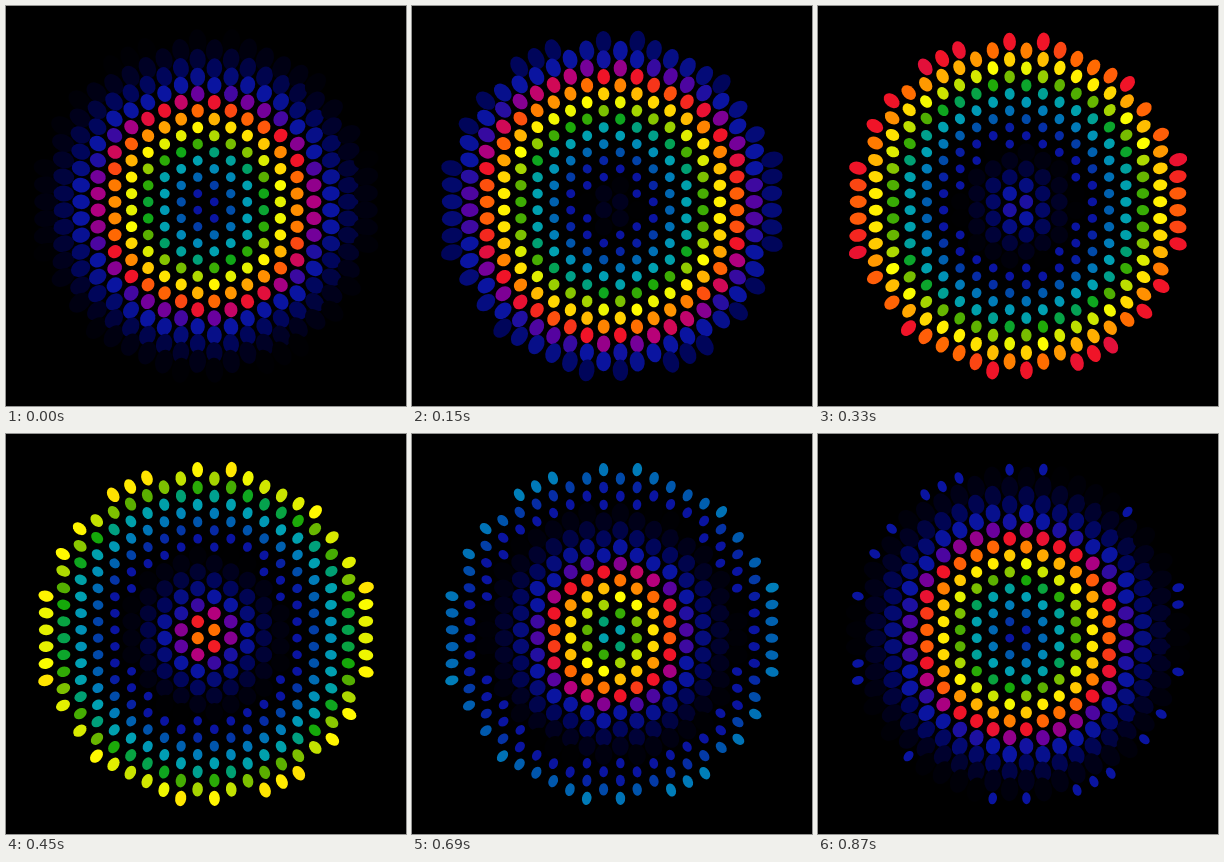
Write an HTML page with a canvas that moves like this. It is 400 px wide and 400 px high and loops after 900 ms.

```html
<!DOCTYPE html>
<html lang="en">
<head>
<meta charset="utf-8">
<title>Rainbow dot wave</title>
<style>
  html, body { margin: 0; width: 100%; height: 100%; overflow: hidden; background: #000; }
  canvas { display: block; width: 100vmin; height: 100vmin; }
</style>
</head>
<body>
<canvas id="stage" width="400" height="400"></canvas>
<script>
const ctx = document.getElementById('stage').getContext('2d');
const LOOP = 900, STEP = 30;
const SPEED = 0.19, WAVE = LOOP * SPEED;
const TAIL = -80.4;            // dots vanish this far behind the yellow crest
const GAP = 16.5, LIMIT = 164.6;

// Colours by distance ahead of the yellow crest
const stops = [
  [-81, 0x0a14a0], [-63, 0x0a14a0], [-52, 0x0050aa], [-42, 0x007db9],
  [-35, 0x00a0b4], [-27, 0x00a0aa], [-22, 0x00a064], [-18, 0x14a80a],
  [-13, 0x5aaf00], [-8, 0xa0d200], [-4, 0xdcec00], [0, 0xffff00],
  [6, 0xffd200], [11, 0xffa500], [17, 0xff6e00], [20, 0xff5a0a],
  [23, 0xf01428], [26, 0xf01428], [30, 0xb4007d], [35, 0x6400a0],
  [41, 0x0a14a0], [49, 0x0a14a0], [57, 0x00055a], [62, 0x00055a],
  [74, 0x00001e], [91, 0x000000]
].map(([at, hex]) => [at, [hex >> 16, hex >> 8 & 255, hex & 255]]);

function colorAt(d) {
  const i = Math.max(1, stops.findIndex(([at]) => at >= d));
  const [a, from] = stops[i - 1], [b, to] = stops[i];
  const k = (d - a) / (b - a);
  return `rgb(${from.map((c, n) => Math.round(c + (to[n] - c) * k))})`;
}

// Staggered lattice, pushed outwards and stretched radially near the rim
const dots = [];
for (let col = -10; col < 10; col++) {
  for (let row = -11; row <= 11; row++) {
    const x = (col + 0.5) * GAP;
    const y = (row + (col % 2 ? 0.25 : -0.25)) * GAP;
    const r = Math.hypot(x, y);
    if (r > LIMIT) continue;
    const rim = r / 161;
    dots.push({
      angle: Math.atan2(y, x),
      r: r + 3.4 * rim ** 4.2,
      stretch: 1 + 0.4 * rim ** 2.5
    });
  }
}

function draw(time) {
  const t = Math.floor(time % LOOP / STEP) * STEP;
  const crest = 15 + SPEED * (t - 570);
  ctx.setTransform(1, 0, 0, 1, 0, 0);
  ctx.fillStyle = '#000';
  ctx.fillRect(0, 0, 400, 400);
  for (const { angle, r, stretch } of dots) {
    const d = ((r - crest - TAIL) % WAVE + WAVE) % WAVE + TAIL;
    const radius = 5.4 + d * (d < 0 ? 0.015 : 0.04);
    ctx.setTransform(1, 0, 0, 1, 200, 200);
    ctx.rotate(angle);
    ctx.fillStyle = colorAt(d);
    ctx.beginPath();
    ctx.ellipse(r, 0, radius * stretch, radius, 0, 0, 2 * Math.PI);
    ctx.fill();
  }
}

const start = performance.now();
function tick() {
  draw(performance.now() - start);
  requestAnimationFrame(tick);
}
tick();
</script>
</body>
</html>
```
